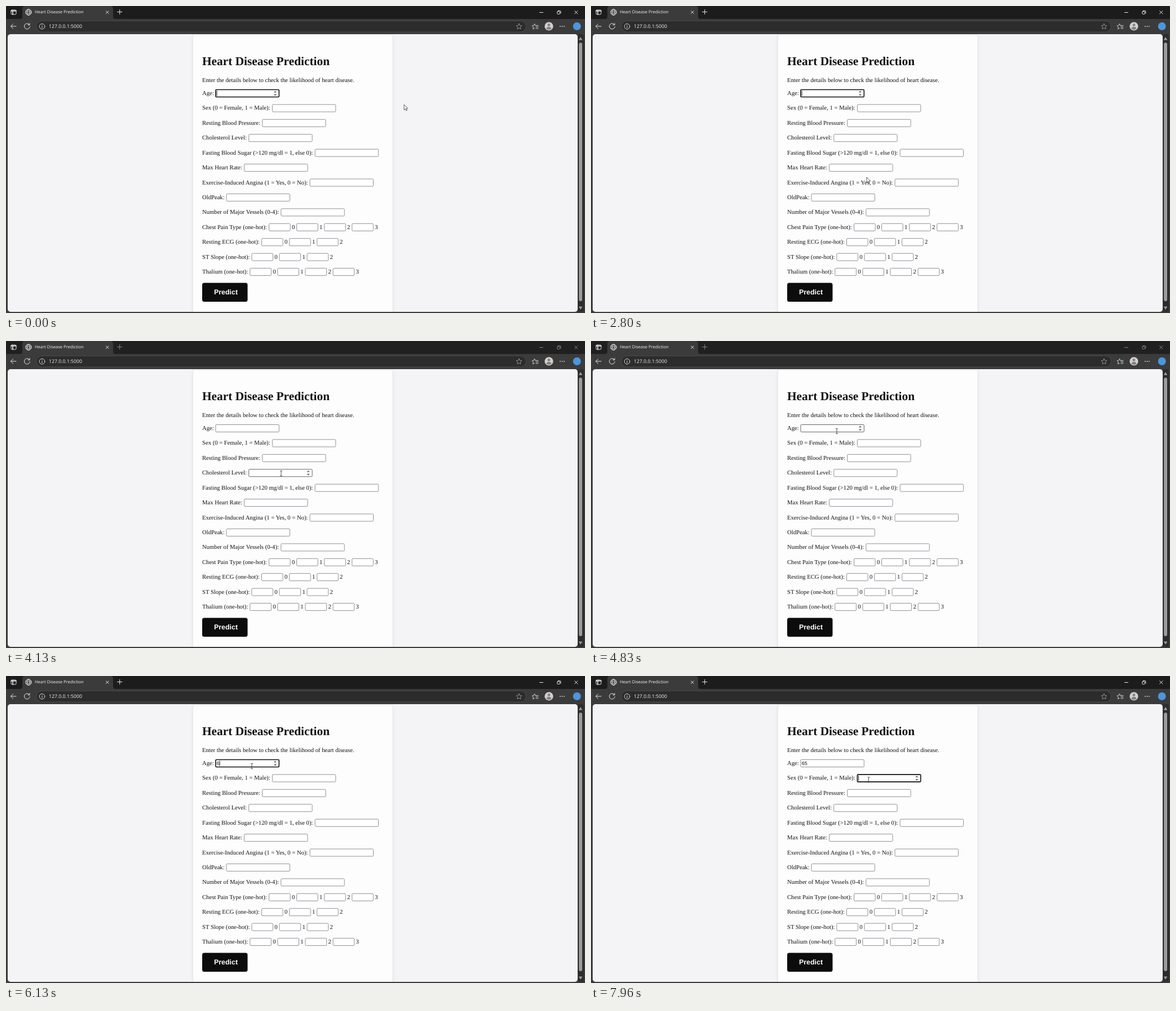
An HTML page that plays this animation: 1027x545 px, repeating every 8 s.

```html
<!DOCTYPE html>
<html lang="en">
<head>
<meta charset="utf-8">
<title>Heart Disease Prediction</title>
<style>
html, body { margin: 0; width: 100%; height: 100%; overflow: hidden; background: #3b3b3b; }
svg { display: block; width: 100%; height: 100%; }
text { text-rendering: geometricPrecision; white-space: pre; }
.ui { font-family: "Open Sans", "Noto Sans", sans-serif; fill: #f2f2f2; }
.body { font: 10.66px "Liberation Serif", "Times New Roman", serif; fill: #111; }
.value { font: 8.9px "Liberation Sans", Arial, sans-serif; fill: #111; }
.icon { fill: none; stroke: #e6e6e6; stroke-width: 1; stroke-linecap: round; stroke-linejoin: round; }
</style>
</head>
<body>
<svg id="stage" viewBox="0 0 1027 545" preserveAspectRatio="none"></svg>
<script>
const LOOP = 8000;
const stage = document.getElementById('stage');

const rect = (x, y, w, h, fill, extra = '') =>
  `<rect x="${x}" y="${y}" width="${w}" height="${h}" fill="${fill}" ${extra}/>`;
const path = (d, extra = '') => `<path d="${d}" ${extra}/>`;
const text = (x, y, str, cls, extra = '') =>
  `<text x="${x}" y="${y}" class="${cls}" ${extra}>${str}</text>`;

// Form rows: label, first input x, number of one-hot boxes
const rows = [
  ['Age:', 371.5],
  ['Sex (0 = Female, 1 = Male):', 472],
  ['Resting Blood Pressure:', 454.3],
  ['Cholesterol Level:', 430.3],
  ['Fasting Blood Sugar (&gt;120 mg/dl = 1, else 0):', 547.8],
  ['Max Heart Rate:', 422.2],
  ['Exercise-Induced Angina (1 = Yes, 0 = No):', 538.7],
  ['OldPeak:', 390.6],
  ['Number of Major Vessels (0-4):', 487.4],
  ['Chest Pain Type (one-hot):', 466.1, 4],
  ['Resting ECG (one-hot):', 453.1, 3],
  ['ST Slope (one-hot):', 435.5, 3],
  ['Thalium (one-hot):', 432.4, 4]
];
const rowY = i => 155 + i * 26.42;
const FIELD_W = 113.2, BOX_W = 38.4, BOX_STEP = 49.1;
const AGE = 0, SEX = 1;

function inputBox(x, y, w, id = '') {
  return rect(x + .4, y - 6.5, w - .8, 13, '#fff',
    `${id && `id="${id}"`} rx="1.5" stroke="#85858d" stroke-width=".9"`);
}

function formRow([label, x, boxes], i) {
  const y = rowY(i);
  let out = text(348, y + 3, label, 'body');
  if (!boxes) {
    const sx = x + FIELD_W - 7.3;
    return out + inputBox(x, y, FIELD_W, 'field' + i) +
      path(`M${sx - 2.6} ${y - 1.6}h5.2l-2.6-3zM${sx - 2.6} ${y + 1.6}h5.2l-2.6 3z`,
        `id="spin${i}" fill="#6b6b6b" visibility="hidden"`);
  }
  for (let k = 0; k < boxes; k++) {
    const bx = x + k * BOX_STEP;
    out += inputBox(bx, y, BOX_W) + text(bx + BOX_W + 2.4, y + 3, k, 'body');
  }
  return out;
}

function browserChrome() {
  return rect(0, 0, 1027, 545, '#3b3b3b') +
    rect(0, 0, 1027, 23, '#1c1c1c', 'id="titlebar"') +
    path('M25 23q4 0 4-4V5q0-5 5-5h151q5 0 5 5v14q0 4 4 4z', 'fill="#3b3b3b"') +
    // Tab strip
    `<g class="icon">` +
    rect(9, 7, 9, 8, 'none', 'rx="1.8"') + path('M9 8.6h9M12 9v6', 'stroke-width="1.6"') +
    `<circle cx="40" cy="11" r="5.2"/><ellipse cx="40" cy="11" rx="2.3" ry="5.2"/>` +
    path('M35.3 9.2h9.4M35.3 12.8h9.4', 'stroke-width=".8"') +
    path('M177.4 8.8l4.6 4.6m0-4.6l-4.6 4.6') + `</g>` +
    text(51, 13.4, 'Heart Disease Prediction', 'ui', 'font-size="7.57"') +
    `<g id="controls" class="icon" stroke-width=".9">` +
    path('M197.5 10.5h8.4m-4.2-4.2v8.4') + path('M946.5 11.5h6') +
    rect(977.8, 9.8, 4.6, 4.6, 'none', 'rx=".8"') + path('M979.3 8.4h3.4q1.2 0 1.2 1.2v3.4') +
    path('M1008.6 8.6l5.4 5.4m0-5.4l-5.4 5.4') + `</g>` +
    // Toolbar
    rect(54, 26.5, 868.5, 19.5, '#2c2c2c', 'rx="9.7" stroke="#505050" stroke-width=".8"') +
    `<g class="icon">` + path('M18 36H8.6m4-4.2l-4.2 4.2l4.2 4.2') +
    path('M41.6 33.2A5 5 0 1 0 42.4 36.8M42 30.8v2.9h-3') +
    `<circle cx="64" cy="36.3" r="4.8" stroke-width=".9"/>` + path('M64 36v2.6M64 34v.1') +
    path('M910 31.4l1.5 3.2l3.5.4l-2.6 2.4l.7 3.5l-3.1-1.8l-3.1 1.8l.7-3.5l-2.6-2.4l3.5-.4z',
      'stroke="#a8a8a8" stroke-width=".8"') +
    path('M941 34.8h-2l-1.5-3.2l-1.4 3l-3 .5l2.2 2.4l-.6 3.3l2.6-1.4M940 37.2h4M940 39.8h4M941 34.7h3',
      'stroke-width=".9"') + `</g>` +
    text(76, 39.3, '127.0.0.1:5000', 'ui', 'font-size="8.7"') +
    `<circle cx="963" cy="36" r="7.6" fill="#d3d0ce"/><circle cx="963" cy="33.7" r="2.4" fill="#858180"/>` +
    path('M958.6 40.6q0-3.5 4.4-3.5t4.4 3.5q-4.4 3-8.8 0z', 'fill="#858180"') +
    [983, 986.5, 990].map(x => `<circle cx="${x}" cy="36.2" r=".85" fill="#e6e6e6"/>`).join('') +
    `<circle cx="1012.7" cy="36" r="7" fill="#4b96dc"/>` +
    // Scrollbar
    rect(1014, 50, 11, 493, '#2d2d2d', 'rx="4"') +
    rect(1016.2, 65, 5.8, 459, '#9c9c9c', 'rx="2.9"') +
    path('M1015.8 60.5h6.6l-3.3-5.5zM1015.8 533.5h6.6l-3.3 5.5z', 'fill="#9c9c9c"');
}

function page() {
  return `<g clip-path="url(#view)">` + rect(3, 50, 1011, 493, '#f4f4f7') +
    rect(332, 51, 353.5, 520, '#000', 'rx="5" opacity=".1" filter="url(#soft)"') +
    rect(332, 51, 353.5, 520, '#fdfdfd', 'rx="5"') +
    text(348, 105, 'Heart Disease Prediction', 'body', 'style="font-size:21.35px;font-weight:bold"') +
    text(348, 135, 'Enter the details below to check the likelihood of heart disease.', 'body') +
    rows.map(formRow).join('') +
    rect(348, 491.5, 80.5, 33.5, '#0c0c0c', 'rx="3.5"') +
    text(369, 512, 'Predict', 'value', 'style="font-size:12.4px;font-weight:bold;fill:#fff"') +
    text(373.8, 158.2, '', 'value', 'id="age"') +
    rect(0, 0, .9, 9.4, '#111', 'id="caret"') + `</g>`;
}

stage.innerHTML =
  `<defs><clipPath id="view"><rect x="3" y="50" width="1011" height="493" rx="5"/></clipPath>
  <filter id="soft" x="-10%" y="-10%" width="120%" height="120%"><feGaussianBlur stdDeviation="3.4"/></filter></defs>` +
  browserChrome() + page() +
  path('M0 0V9.6L2.3 7.5L3.8 10.9L5.3 10.2L3.8 6.9H6.8Z',
    'id="arrow" fill="#fff" stroke="#333" stroke-width=".8" stroke-linejoin="round"') +
  path('M-2-4.5h1.4L0-4L.6-4.5H2M0-4V4M-2 4.5h1.4L0 4l.6.5H2',
    'id="beam" fill="none" stroke="#222" stroke-width=".8"');

const el = id => document.getElementById(id);
const show = (id, on) => el(id).setAttribute('visibility', on ? 'visible' : 'hidden');

// Pointer hot spot: time, x, y
const pointerPath = [
  [0, 706, 175], [970, 706, 175], [1130, 611, 272], [1630, 611, 272], [1660, 594, 284],
  [2200, 594, 284], [2500, 489, 304], [3800, 489, 304], [4010, 488.5, 258], [4100, 488, 235],
  [4150, 488, 235], [4400, 436, 160], [7190, 436, 160], [7230, 492.5, 184], [LOOP, 492.5, 184]
];
const caretOn = [
  [0, 600], [1130, 1660], [2200, 2830], [4850, 5400],
  [5860, 6400], [6660, 7400], [7930, LOOP]
];

function pointerAt(t) {
  const i = pointerPath.findIndex(p => p[0] > t);
  const [t0, x0, y0] = pointerPath[i - 1], [t1, x1, y1] = pointerPath[i];
  const k = (t - t0) / (t1 - t0);
  return [x0 + (x1 - x0) * k, y0 + (y1 - y0) * k];
}

function draw(t) {
  const active = t < 2830 || t >= 4850;
  const focus = !active ? -1 : t < 6870 ? AGE : SEX;
  const value = t < 5860 ? '' : t < 6660 ? '6' : '65';
  const [px, py] = pointerAt(t);
  let overInput = false;

  rows.forEach(([, x, boxes], i) => {
    if (boxes) return;
    const dy = Math.abs(py - rowY(i));
    const onInput = dy < 7 && px >= x && px <= x + FIELD_W;
    const onLabel = dy < 5.5 && px >= 348 && px < x - 2.5;
    const hover = onInput || onLabel, focused = i === focus;
    overInput = overInput || onInput;
    el('field' + i).setAttribute('stroke', focused ? '#101010' : hover ? '#55555c' : '#85858d');
    el('field' + i).setAttribute('stroke-width', focused ? 1.6 : .9);
    show('spin' + i, hover || focused);
  });

  el('age').textContent = value;
  show('caret', active && caretOn.some(([a, b]) => t >= a && t < b));
  const caretX = focus === SEX ? 474.2 : 373.6 + value.length * 5.1;
  el('caret').setAttribute('x', caretX);
  el('caret').setAttribute('y', rowY(Math.max(focus, 0)) - 4.7);

  el('controls').style.stroke = active ? '#e6e6e6' : '#858585';
  el('titlebar').setAttribute('fill', active ? '#1c1c1c' : '#202020');

  show('arrow', !overInput);
  show('beam', overInput);
  el(overInput ? 'beam' : 'arrow').setAttribute('transform', `translate(${px} ${py})`);
}

const start = performance.now();
function tick() {
  draw((performance.now() - start) % LOOP);
  requestAnimationFrame(tick);
}
tick();
</script>
</body>
</html>
```
